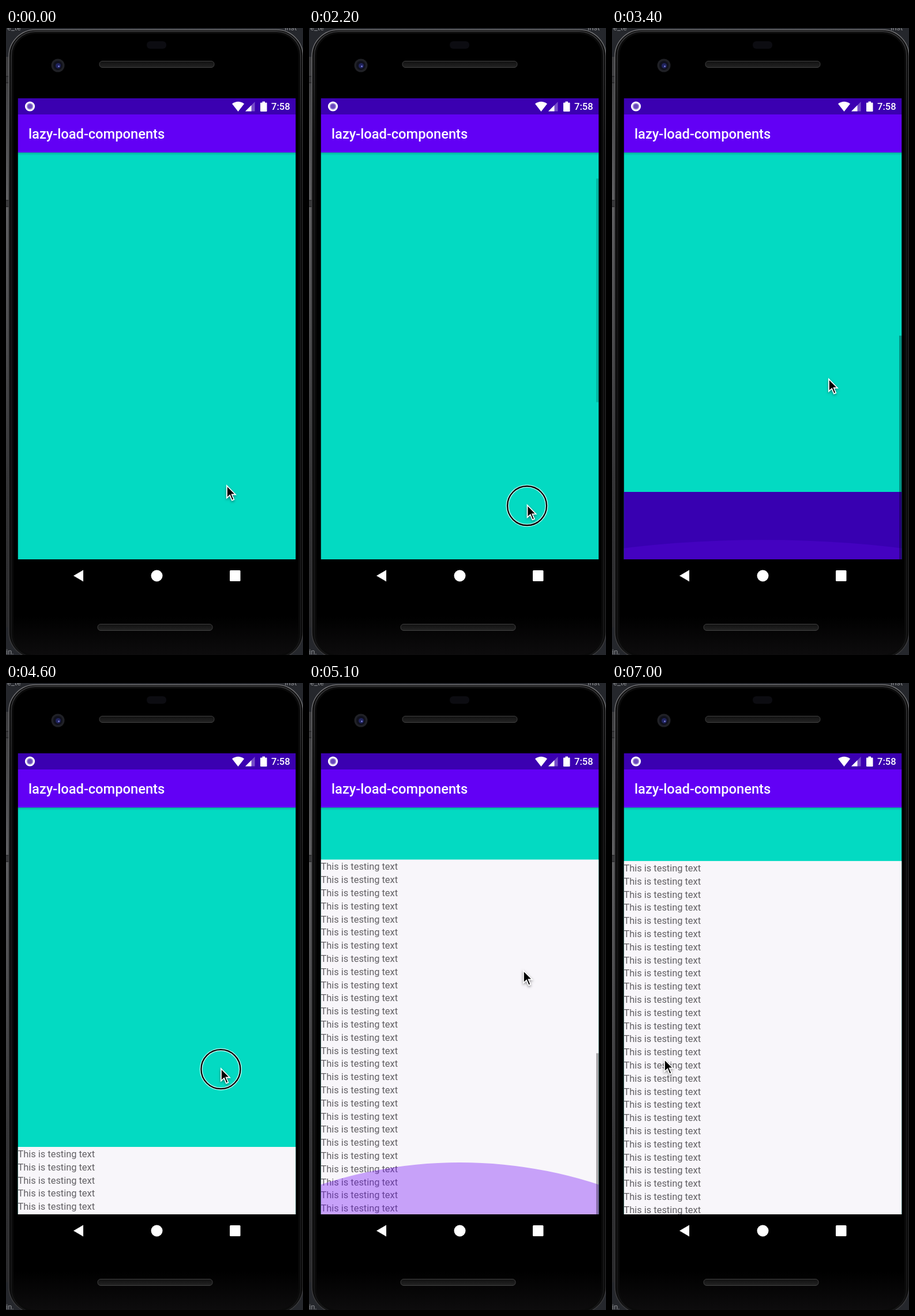
An HTML page with a canvas for the animation above (7300 ms loop, 515 by 1088 pixels).

```html
<!DOCTYPE html>
<html lang="en">
<head>
<meta charset="utf-8">
<title>lazy-load-components</title>
<style>
html, body { margin: 0; width: 100%; height: 100%; overflow: hidden; background: #000; }
canvas { display: block; width: 515px; height: 1088px; }
</style>
</head>
<body>
<canvas id="stage" width="515" height="1088"></canvas>
<script>
const ctx = document.getElementById('stage').getContext('2d');
const LOOP = 7300, STEP = 100, LAST = 7000;
const LEFT = 20.5, WIDTH = 482, TOP = 216, BOTTOM = 922, VIEW = BOTTOM - TOP;
const TEAL_HEIGHT = 1167, LINES = 27, PITCH = 22.8, PLACEHOLDER = 117;
const LOADED_AT = 3700, SLOP = 15;
const SHORT_END = TEAL_HEIGHT + PLACEHOLDER - VIEW;
const LONG_END = TEAL_HEIGHT + LINES * PITCH - VIEW;

// Pointer glides; one with a press drags the page, then flings it at `speed` px/ms until `stop`.
const glides = [
  { from: 0, to: 200, x: 365, y: 777 },
  { from: 700, to: 1500, x: 366, y: 694, press: 500, speed: 0, stop: 1400, limit: SHORT_END, glow: 0 },
  { from: 1500, to: 1900, x: 378, y: 855 },
  { from: 2100, to: 2950, x: 375, y: 607, press: 2100, speed: .8, stop: 3300, limit: SHORT_END, glow: .5 },
  { from: 3600, to: 4100, x: 372, y: 667 },
  { from: 4600, to: 4900, x: 371, y: 497, press: 4600, speed: 1.75, stop: 5100, limit: LONG_END, glow: 1 },
  { from: 5300, to: 5900, x: 90, y: 651 }
];

const ramp = (t, a, b) => Math.max(0, Math.min(1, (t - a) / (b - a)));

function pose(t) {
  const p = { x: 382, y: 792, scroll: 0, bar: 0, glow: 0, pressed: false };
  for (const g of glides) {
    if (t < (g.press ?? g.from)) break;
    const k = ramp(t, g.from, g.to);
    if (g.press) {
      const dragged = Math.max(0, (p.y - g.y) * k - SLOP);
      const flung = g.speed * Math.max(0, t - g.to);
      p.scroll = Math.min(g.limit, p.scroll + dragged + flung);
      p.pressed = t < g.to;
      p.bar = ramp(t, g.from + 50, g.from + 150) * (1 - ramp(t, g.stop + 300, g.stop + 550));
      p.glow = t < g.stop ? 0 : g.glow * (1 - ramp(t, g.stop, g.stop + 400));
    }
    p.x += (g.x - p.x) * k;
    p.y += (g.y - p.y) * k;
  }
  p.scroll -= 2.5 * ramp(t, 5300, 5400);
  return p;
}

function rect(x, y, w, h, fill) {
  ctx.fillStyle = fill;
  ctx.fillRect(x, y, w, h);
}

function round(x, y, w, h, r, fill, stroke, line = 1) {
  ctx.beginPath();
  ctx.roundRect(x, y, w, h, r);
  ctx.fillStyle = fill;
  ctx.fill();
  if (stroke) { ctx.strokeStyle = stroke; ctx.lineWidth = line; ctx.stroke(); }
}

function disc(x, y, r, fill) {
  ctx.beginPath();
  ctx.arc(x, y, r, 0, 7);
  ctx.fillStyle = fill;
  ctx.fill();
}

function ringLine(x, y, r, line, color) {
  ctx.beginPath();
  ctx.arc(x, y, r, 0, 7);
  ctx.lineWidth = line;
  ctx.strokeStyle = color;
  ctx.stroke();
}

function path(d, fill, x = 0, y = 0) {
  ctx.save();
  ctx.translate(x, y);
  ctx.fillStyle = fill;
  ctx.fill(new Path2D(d));
  ctx.restore();
}

function label(text, x, y, font, fill) {
  ctx.font = font + ' Roboto, sans-serif';
  ctx.fillStyle = fill;
  ctx.fillText(text, x, y);
}

function fade(y0, y1, ...colors) {
  const g = ctx.createLinearGradient(0, y0, 0, y1);
  colors.forEach((c, i) => g.addColorStop(i / (colors.length - 1), c));
  return g;
}

function drawPhone() {
  rect(0, 0, 515, 1088, '#25272c');
  label('e_te', 2, 4, '13px', '#8c8e92');
  label('inst', 483, 4, '13px', '#8c8e92');
  label('in.', 0, 1087, '13px', '#8c8e92');
  rect(0, 50, 8, 990, fade(50, 1040, '#3c3c3e', '#606062', '#4c4c4e', '#343436', '#29292b'));
  for (const y of [84, 299]) round(-2, y, 8, 11, 1, '#3a3a3c', '#161618');

  round(5, 3, 510, 1091, 46, '#0a0a0a', fade(0, 300, '#77777a', '#3a3a3c'), 1.5);
  round(9, 6, 502, 1086, 42, '#0a0a0a', fade(0, 200, '#343436', '#161617'), 2);
  round(13, 10, 494, 1078, 38, fade(1020, 1088, '#000', '#0d0c0d'));
  round(244, 23, 34, 13, 6, '#0c0c11');

  disc(90, 65, 11.5, '#202126');
  disc(90, 65, 8, '#10111c');
  disc(90.5, 65.5, 4.5, '#20245e');
  disc(91.5, 66.5, 1.3, '#8a8dea');
  for (const [x, y] of [[162, 57.5], [159, 1034.5]]) {
    round(x, y, 199, 11, 5, fade(y, y + 11, '#111', '#232323'), '#414141');
  }
  path('M0 0L17-10V10Z', '#fff', 117, 950.5);
  disc(261.5, 950.5, 10, '#fff');
  round(388, 941, 18.5, 19, 1.5, '#fff');
}

function drawContent(scroll, loaded) {
  const edge = TOP + TEAL_HEIGHT - scroll;
  rect(LEFT, TOP, WIDTH, VIEW, '#03dac2');
  if (!loaded) {
    rect(LEFT, edge, WIDTH, PLACEHOLDER, '#3800b1');
    return;
  }
  rect(LEFT, edge, WIDTH, LINES * PITCH + 4, '#f8f6fa');
  for (let i = 0; i < LINES; i++) {
    label('This is testing text', LEFT, edge + i * PITCH + 18, '16.4px', '#626064');
  }
}

function drawGlow(strength) {
  const radius = 774, height = 90;
  ctx.save();
  ctx.translate(LEFT + WIDTH / 2, BOTTOM);
  ctx.scale(1, strength);
  disc(0, radius - height, radius, `rgba(112,10,245,${.36 * Math.sqrt(strength)})`);
  ctx.restore();
}

function drawBars() {
  rect(LEFT, TOP, WIDTH, 5, fade(TOP, TOP + 5, 'rgba(0,0,0,.2)', 'rgba(0,0,0,0)'));
  rect(LEFT, 122, WIDTH, 28, '#3b00b1');
  rect(LEFT, 150, WIDTH, 66, '#6200f5');
  label('lazy-load-components', 39, 192, '500 23.7px', '#fff');

  disc(41.5, 136, 8.6, '#fff');
  disc(41.5, 136, 5.8, '#a692d9');
  disc(41.5, 136, 4, '#6a48bd');
  path('M402.5 145L392 131.5Q402.5 124 413 131.5Z', '#fff');
  path('M415 144.5H431.5V128Z', 'rgba(255,255,255,.3)');
  path('M415 144.5H425.5V134Z', '#fff');
  round(441, 129.5, 11.5, 15.5, 1, '#fff');
  rect(444.5, 127.5, 4.5, 3, '#fff');
  label('7:58', 460, 142, '500 16.5px', '#fff');
}

function drawCursor({ x, y, pressed }) {
  if (pressed) {
    ringLine(x + .4, y + 3.2, 34, 5, 'rgba(255,255,255,.75)');
    ringLine(x + .4, y + 3.2, 34, 2.3, '#000');
  }
  ctx.save();
  ctx.shadowColor = 'rgba(0,0,0,.4)';
  ctx.shadowBlur = 4;
  ctx.shadowOffsetY = 2;
  path('M0 0V25.5L5.8 20.3L9.4 28.8L14.4 26.7L10.8 18.4H18Z', '#fff', x, y);
  ctx.restore();
  path('M1.8 4.2V21.4L6.5 17.2L10.3 26.4L12.1 25.6L8.3 16.6H14Z', '#000', x, y);
}

function draw(t) {
  const loaded = t >= LOADED_AT, p = pose(t);
  const ratio = VIEW / (VIEW + (loaded ? LONG_END : SHORT_END));
  drawPhone();

  ctx.save();
  ctx.beginPath();
  ctx.rect(LEFT, 122, WIDTH, BOTTOM - 122);
  ctx.clip();
  drawContent(p.scroll, loaded);
  if (p.glow > 0) drawGlow(p.glow);
  rect(498, TOP + p.scroll * ratio, 4.5, VIEW * ratio, `rgba(0,0,0,${.32 * p.bar})`);
  drawBars();
  ctx.restore();

  drawCursor(p);
}

const start = performance.now();
function frame() {
  const t = (performance.now() - start) % LOOP;
  draw(Math.min(LAST, Math.floor(t / STEP) * STEP));
  requestAnimationFrame(frame);
}
frame();
</script>
</body>
</html>
```
